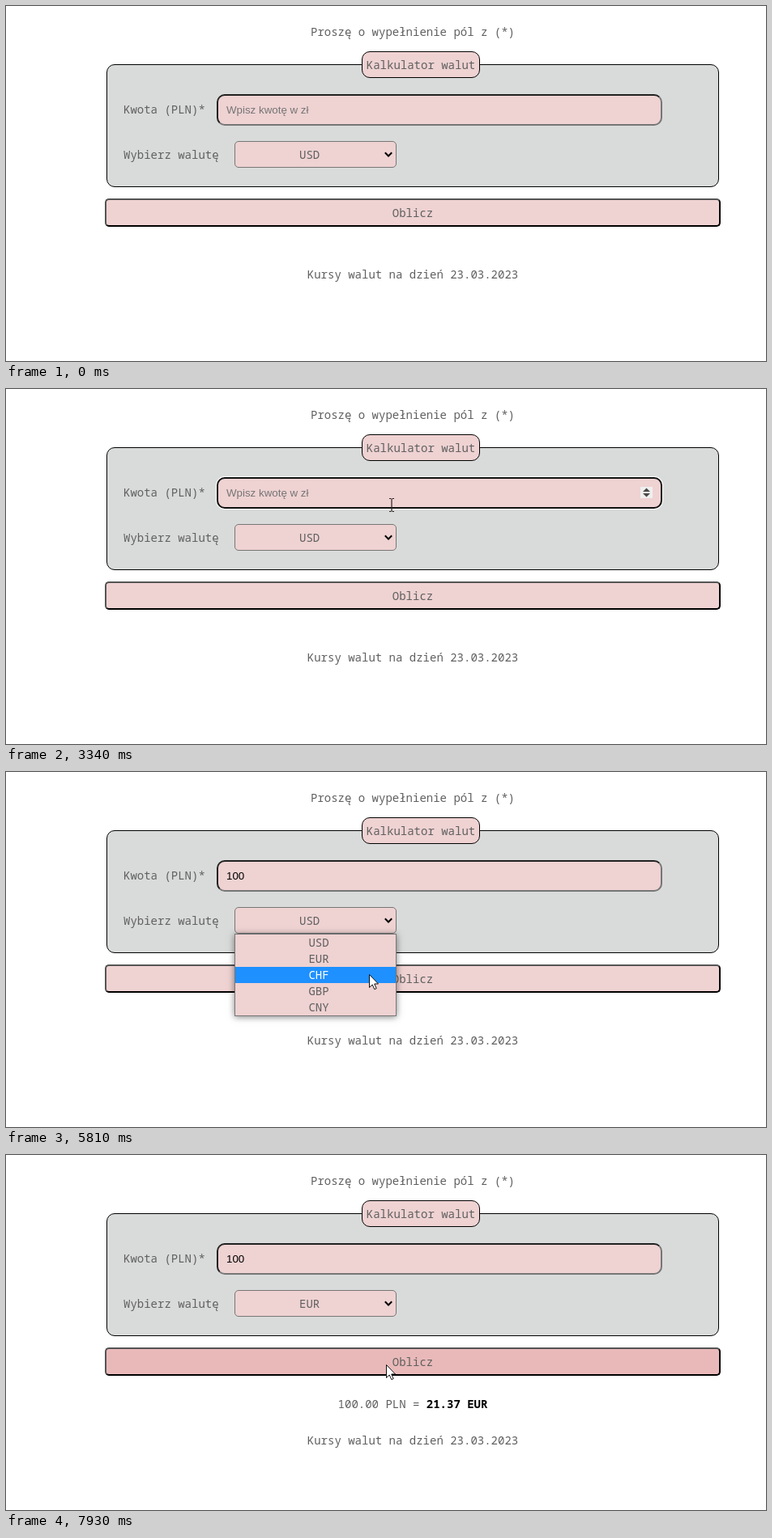
Recreate the animation shown at these times as an HTML page. Size 938 by 439 pixels, loop 8 s.

```html
<!DOCTYPE html>
<html lang="pl">
<head>
<meta charset="utf-8">
<title>Kalkulator walut</title>
<style>
  html, body { margin: 0; width: 100%; height: 100%; overflow: hidden; background: #fff; }
  body { position: relative; font: 300 14px/20px "Roboto Mono", "Noto Sans Mono", monospace; color: #606060; }
  div, svg { position: absolute; box-sizing: border-box; white-space: pre; }
  .mid { left: 122px; width: 760px; text-align: center; }
  .pink { background: #efd2d2; }
  #panel { left: 124px; top: 72px; width: 756px; height: 152px; border: 1px solid #000; border-radius: 10px; background: #d9dbda; }
  #legend { left: 439px; top: 56px; width: 146px; height: 33px; border: 1px solid #000; border-radius: 10px; text-align: center; line-height: 32px; }
  #field { left: 260px; top: 109px; width: 550px; height: 39px; border: 2px inset rgb(118, 118, 118); border-radius: 10px; }
  #field.focus { border: 2px solid #101010; box-shadow: 0 0 0 1px #fff; }
  #value { left: 272px; top: 121px; font: 400 13.333px/15px Arial, "Liberation Sans", sans-serif; color: #757575; }
  #value.typed { color: #000; }
  #caret { top: 121px; width: 1px; height: 15px; background: #000; }
  #select { left: 282px; top: 167px; width: 200px; height: 33px; border: 1px solid #767676; border-radius: 5px; }
  #select.focus { border-color: #101010; box-shadow: inset 0 0 0 1px #101010, 0 0 0 1px #fff; }
  #choice { left: 362px; top: 174px; }
  #button { top: 238px; height: 35px; border: 2px outset #000; border-radius: 5px; line-height: 32px; }
  #button.hover { background: #e9b9b9; }
  #popup { left: 282px; top: 200px; width: 200px; height: 102px; border: 1px solid #767676; box-shadow: 0 1px 8px rgba(0, 0, 0, .5); }
  #popup div { left: 0; width: 198px; height: 20px; padding-left: 8px; text-align: center; }
  #popup .on { background: #1e90ff; color: #fff; }
  b { font-weight: 700; color: #000; }
</style>
</head>
<body>
<div class="mid" style="top:22px">Proszę o wypełnienie pól z (*)</div>
<div id="panel"></div>
<div id="legend" class="pink">Kalkulator walut</div>
<div style="left:145px;top:118px">Kwota (PLN)*</div>
<div id="field" class="pink"></div>
<div id="value"></div>
<div id="caret"></div>
<svg id="spinner" style="left:783px;top:121px" width="15" height="14">
  <rect width="15" height="14" fill="#efefef"/>
  <path d="M3 6L7.5 1.5 12 6ZM3 8L7.5 12.5 12 8Z" fill="#484848"/>
</svg>
<div style="left:145px;top:174px">Wybierz walutę</div>
<div id="select" class="pink"></div>
<div id="choice"></div>
<svg style="left:466px;top:179px" width="12" height="10">
  <path d="M1.8 2.3L6 6.5 10.2 2.3" fill="none" stroke="#000" stroke-width="2"/>
</svg>
<div id="button" class="mid pink">Oblicz</div>
<div id="result" class="mid" style="top:298px">100.00 PLN = <b>21.37 EUR</b></div>
<div id="rates" class="mid">Kursy walut na dzień 23.03.2023</div>
<div id="popup" class="pink"></div>
<svg id="pointer" style="left:0;top:0" width="938" height="439">
  <g id="hot">
    <circle id="halo" r="12" fill="#ffe832" opacity=".65"/>
    <path id="arrow" d="M.5 .5V16.5L4.2 13 6.8 18.7 9.2 17.6 6.7 12H11.5Z" fill="#fff" stroke="#111"/>
    <path id="beam" d="M-1 -7.5H1.5M2.5 -7.5H5M2 -7V8M-1 8.5H1.5M2.5 8.5H5" fill="none" stroke="#2a2020" stroke-width="1.2"/>
  </g>
</svg>
<script>
const LOOP = 8000, STEP = 65, BLINK = 530, CLICK = 100;
const FOCUS = 1840, BLUR = 5350, OPEN = 5415, PICK = 7060, PRESS = 7800, DONE = 7930;
const clicks = [FOCUS - CLICK, OPEN - 35, PICK - 70, PRESS];
const keys = [3740, 3940, 4160];
const codes = ["USD", "EUR", "CHF", "GBP", "CNY"];
// Pointer moves from wherever it rests: start, end, x, y
const moves = [
  [380, 640, 735, 140],
  [640, 965, 400, 140],
  [965, 1160, 455, 207],
  [1210, 1665, 471, 133],
  [2610, 2675, 474, 143],
  [4890, 5345, 459, 192],
  [5680, 5875, 448, 250],
  [6270, 6400, 448, 238],
  [7250, 7575, 469, 259]
];

const $ = id => document.getElementById(id);
const show = (id, on) => { $(id).style.display = on ? "" : "none"; };
const mark = (id, name, on) => $(id).classList.toggle(name, on);

const rows = codes.map((code, i) => {
  const row = document.createElement("div");
  row.textContent = code;
  row.style.top = i * 20 + "px";
  $("popup").append(row);
  return row;
});

// The pointer advances in even steps, as a screen recorder samples it
function pointerAt(t) {
  let px = 890, py = 510;
  for (const [start, end, x, y] of moves) {
    if (t < start) break;
    const k = Math.min(1, (Math.floor((t - start) / STEP) + 1) * STEP / (end - start));
    px += (x - px) * k;
    py += (y - py) * k;
  }
  return [Math.round(px), Math.round(py)];
}

function render(t) {
  const [x, y] = pointerAt(t);
  const inField = x > 260 && x < 810 && y >= 109 && y < 148;
  show("spinner", inField);
  show("arrow", !inField);
  show("beam", inField);
  show("halo", clicks.some(c => t >= c && t < c + CLICK));
  $("hot").setAttribute("transform", `translate(${x} ${y})`);

  const focused = t >= FOCUS && t < BLUR;
  const count = keys.filter(k => t >= k).length;
  const reset = count ? keys[count - 1] : FOCUS - 90;
  $("value").textContent = "100".slice(0, count) || "Wpisz kwotę w zł";
  mark("value", "typed", count > 0);
  mark("field", "focus", focused);
  $("caret").style.left = 272 + Math.floor(count * 7.42) + "px";
  show("caret", focused && Math.floor((t - reset) / BLINK) % 2 === 0);

  const open = t >= OPEN && t < PICK;
  const active = Math.max(0, Math.floor((y - 201) / 20));
  show("popup", open);
  rows.forEach((row, i) => row.classList.toggle("on", i === active));
  mark("select", "focus", t >= PICK && t < PRESS);
  $("choice").textContent = codes[t < PICK ? 0 : 1];

  mark("button", "hover", t >= PICK);
  show("result", t >= DONE);
  $("rates").style.top = (t >= DONE ? 343 : 322) + "px";
}

const begin = performance.now();
function tick() {
  render((performance.now() - begin) % LOOP);
  requestAnimationFrame(tick);
}
tick();
</script>
</body>
</html>
```
